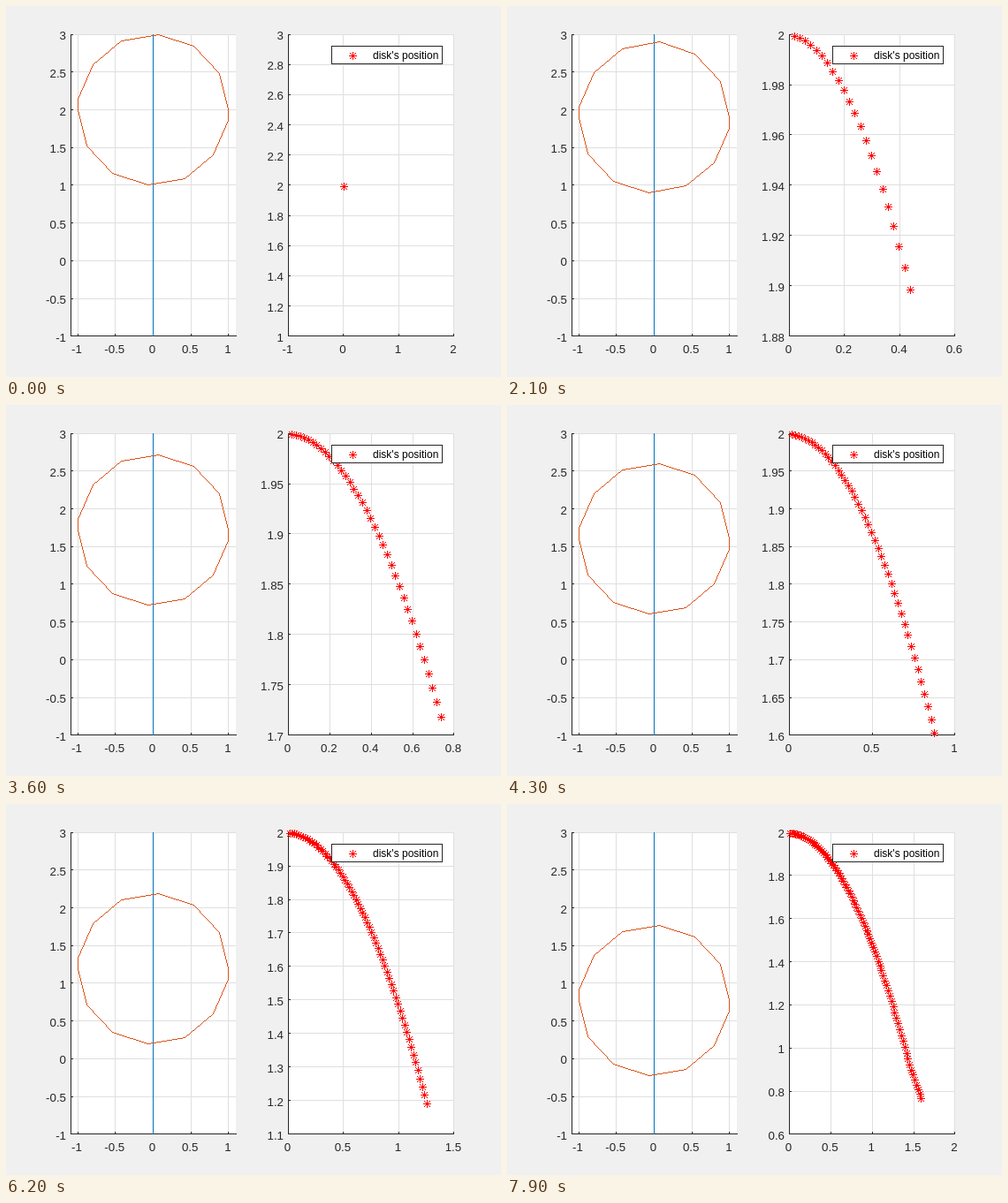
An HTML page with a canvas that plays this animation: 560x420 px, repeating every 8 s.

```html
<!DOCTYPE html>
<html>
<head>
<meta charset="utf-8">
<style>
html, body { margin: 0; width: 560px; height: 420px; overflow: hidden; background: #f0f0f0; }
canvas { display: block; }
</style>
</head>
<body>
<canvas id="stage" width="560" height="420"></canvas>
<script>
const ctx = document.getElementById('stage').getContext('2d');
const TOP = 32.05, HEIGHT = 341.8, BOTTOM = TOP + HEIGHT;
const INK = '#262626', GRID = '#dfdfdf', RED = '#ff0000';
const STEPS = 80, STEP_MS = 100, BRAKE = 70;
const { floor, round, ceil, abs, max } = Math;

function rect(color, x, y, w, h) {
  ctx.fillStyle = color;
  ctx.fillRect(x, y, w, h);
}

function text(str, x, y, align, size, color) {
  ctx.font = size + 'px "Liberation Sans", Arial, sans-serif';
  ctx.textAlign = align;
  ctx.fillStyle = color;
  ctx.fillText(str, x, y);
}

// One-pixel line without smoothing
function line(x0, y0, x1, y1, color) {
  const dx = x1 - x0, dy = y1 - y0;
  const n = max(1, abs(dx), abs(dy));
  for (let i = 0; i <= n; i++) {
    rect(color, round(x0 + dx * i / n), round(y0 + dy * i / n), 1, 1);
  }
}

function star(x, y) {
  rect(RED, x - 4, y, 9, 1);
  rect(RED, x, y - 4, 1, 9);
  for (let d = -3; d <= 3; d++) {
    rect(RED, x + d, y + d, 1, 1);
    rect(RED, x + d, y - d, 1, 1);
  }
}

// Smallest 1-2-5 step that covers the range in at most `most` intervals
function autoAxis(min, max, most) {
  for (let e = -4; e < 2; e++) {
    for (const m of [1, 2, 5]) {
      const step = m * 10 ** e;
      const lo = floor(min / step + 1e-6);
      const hi = ceil(max / step - 1e-6);
      if (hi - lo <= most) return { lo: lo * step, hi: hi * step, step };
    }
  }
}

function ticks({ lo, hi, step }) {
  const list = [];
  for (let i = ceil(lo / step - 1e-6); i * step <= hi + 1e-6 * step; i++) {
    list.push(+(i * step).toFixed(4));
  }
  return list;
}

function axes(left, width, xa, ya) {
  const px = v => left + (v - xa.lo) / (xa.hi - xa.lo) * width;
  const py = v => BOTTOM - (v - ya.lo) / (ya.hi - ya.lo) * HEIGHT;
  const x0 = floor(left), y0 = floor(TOP), y1 = floor(BOTTOM);
  const w = round(width), h = y1 - y0;
  const xs = ticks(xa), ys = ticks(ya);
  rect('#ffffff', x0, y0, w, h);
  for (const v of xs) rect(GRID, floor(px(v)), y0, 1, h);
  for (const v of ys) rect(GRID, x0, floor(py(v)), w, 1);
  rect(INK, x0, y0, 1, h + 1);
  rect(INK, x0, y1, w + 1, 1);
  for (const v of xs) {
    rect(INK, floor(px(v)), y1 - 2, 1, 2);
    text(v, px(v) - 1, 393, 'center', 13.33, INK);
  }
  for (const v of ys) {
    rect(INK, x0, floor(py(v)), 3, 1);
    text(v, x0 - 5, round(py(v)) + 6, 'right', 13.33, INK);
  }
  return { px, py };
}

// Steady acceleration, then braking
function height(k) {
  const free = Math.min(k, BRAKE), late = k - free;
  const drop = 0.0004 * free * (free + 1) / 2 + 0.0004 * BRAKE * late - 0.0004 * late * (late + 1);
  return 2 - drop;
}

const angles = [];
for (const start of [0, Math.PI]) {
  for (let i = 0; i < 7; i++) angles.push(start + i / 2);
}
angles.push(0);

function drawDisk(y) {
  // Equal scale on both axes
  const half = 187 / HEIGHT * 2;
  const { px, py } = axes(73, 187, { lo: -half, hi: half, step: 0.5 }, { lo: -1, hi: 3, step: 0.5 });
  rect('#0072bd', 166, floor(TOP), 1, floor(HEIGHT) + 1);
  const points = angles.map(a => [floor(px(Math.cos(a))), floor(py(y + Math.sin(a)))]);
  for (let i = 1; i < points.length; i++) line(...points[i - 1], ...points[i], '#d95319');
}

function drawTrack(count) {
  const single = count === 1;
  const xa = single ? { lo: -1, hi: 2, step: 1 } : autoAxis(0.02, 0.02 * count, 4);
  const ya = single ? { lo: 1, hi: 3, step: 0.2 } : autoAxis(height(count), height(1), 10);
  const { px, py } = axes(319.5, 187.4, xa, ya);
  for (let k = 1; k <= count; k++) star(floor(px(0.02 * k) - 0.5), floor(py(height(k))) + 1);
}

function drawLegend() {
  rect(INK, 368, 45, 126, 21);
  rect('#ffffff', 369, 46, 124, 19);
  star(392, 56);
  text("disk's position", 415, 60, 'left', 12, '#000000');
}

function draw(now) {
  const count = floor(now / STEP_MS) % STEPS + 1;
  rect('#f0f0f0', 0, 0, 560, 420);
  drawDisk(height(count));
  drawTrack(count);
  drawLegend();
}

function loop() {
  draw(performance.now());
  requestAnimationFrame(loop);
}
loop();
</script>
</body>
</html>
```
